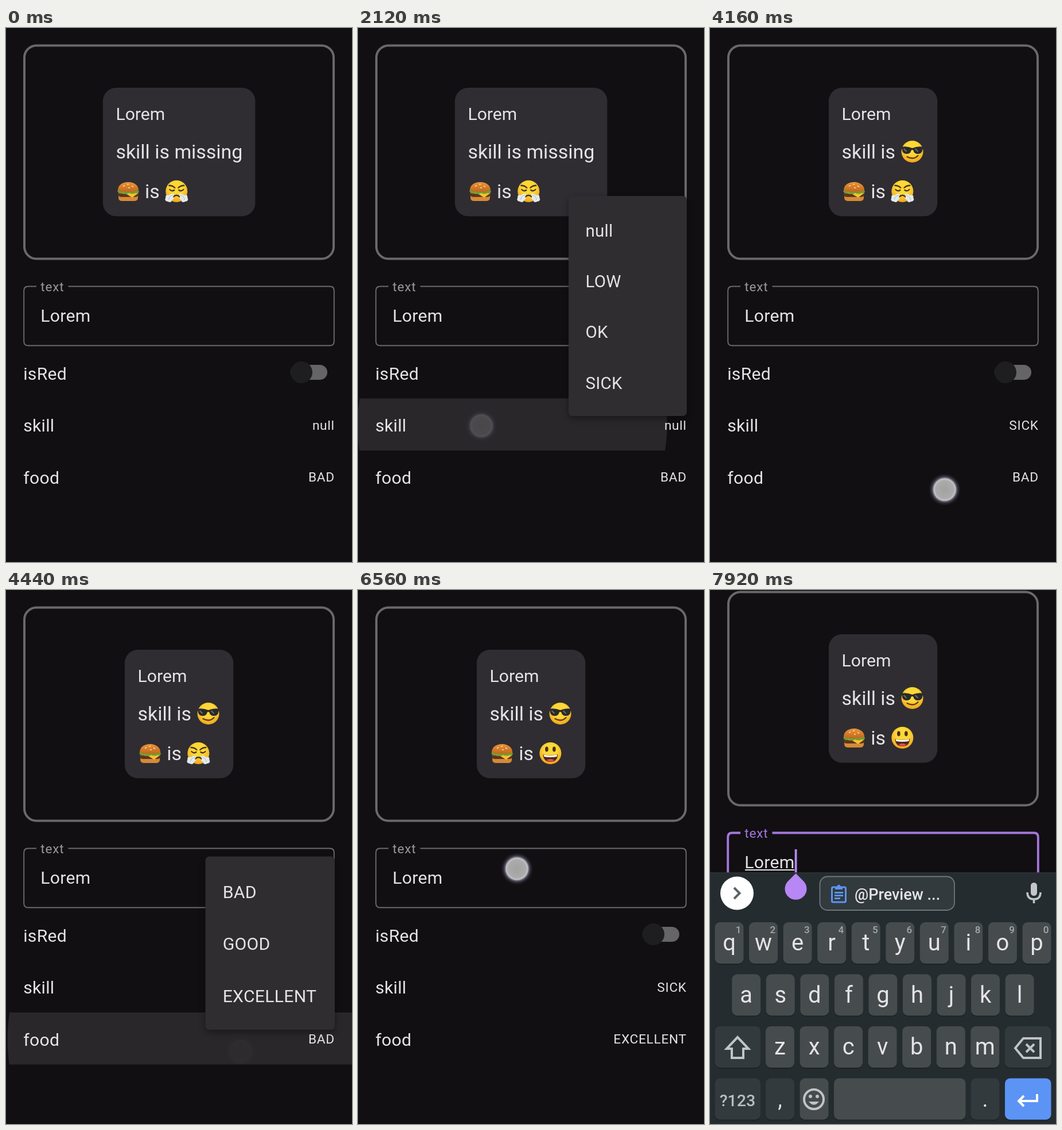
An HTML page for the animation above (8000 ms loop, 603 by 929 pixels).

```html
<!DOCTYPE html>
<html lang="en">
<head>
<meta charset="utf-8">
<title>Component preview</title>
<style>
  html, body { margin: 0; width: 100%; height: 100%; overflow: hidden; background: #110f12; }
  svg { display: block; font-family: Roboto, sans-serif; fill: #e4e3e6; }
  #stage { width: 100%; height: 100%; }
  .body { font-size: 30.15px; letter-spacing: .28px; }
  .small { font-size: 22.6px; letter-spacing: .75px; }
  .card { font-size: 33.9px; }
  .end { text-anchor: end; }
  .mid { text-anchor: middle; }
  .line { fill: none; stroke-width: 4; stroke: #c0c4c6; }
  .menu > rect { fill: #2f2d30; filter: drop-shadow(0 4px 6px rgba(0, 0, 0, .4)); }
</style>
</head>
<body>
<svg id="stage" viewBox="0 0 603 929">
  <defs>
    <radialGradient id="skin" cy=".35" r=".65">
      <stop offset=".45" stop-color="#fdd835"/><stop offset="1" stop-color="#f2a51f"/>
    </radialGradient>
    <linearGradient id="bun" x2="0" y2="1">
      <stop offset="0" stop-color="#e8953a"/><stop offset="1" stop-color="#c5661c"/>
    </linearGradient>
    <radialGradient id="dotFill">
      <stop offset="0" stop-color="#a3a2a3"/><stop offset=".55" stop-color="#acabac"/>
      <stop offset=".68" stop-color="#c3c2c8"/><stop offset=".72" stop-color="#a8a5b8" stop-opacity=".7"/>
      <stop offset=".84" stop-color="#77758c" stop-opacity=".28"/>
      <stop offset="1" stop-color="#66647a" stop-opacity="0"/>
    </radialGradient>
    <g id="burger">
      <path d="M-17 7H17V11Q17 17 10 17H-10Q-17 17-17 11Z" fill="#d58a38"/>
      <path d="M-18 3Q-19 10-12 10H12Q19 10 18 3Z" fill="#62331d"/>
      <path d="M-17 3H18L7 11L-3 5Z" fill="#fbc02d"/>
      <path d="M-17-1H17V3H-17Z" fill="#d8432b"/>
      <path d="M-19 0Q-16-4-12-1Q-6-5 0-1Q6-5 12-1Q16-4 19 0Q18 5 13 3Q8 6 2 3Q-4 7-9 3Q-15 6-19 0Z" fill="#689f38"/>
      <path d="M-18-1C-19-21 19-21 18-1Q0 3-18-1Z" fill="url(#bun)"/>
      <path d="M-9-9l3-1M-2-12h3M6-9l3 1M0-6h3" stroke="#ffe0a0" stroke-width="1.5"/>
    </g>
    <g id="huff">
      <circle r="19" fill="url(#skin)"/>
      <path d="M-13-10Q-7-10-3-6M13-10Q7-10 3-6M-12-3Q-8 1-4-2M12-3Q8 1 4-2M-6 10Q0 4 6 10"
        fill="none" stroke="#4a3420" stroke-width="2.3" stroke-linecap="round"/>
      <g id="puff" fill="#e4eaee">
        <path d="M-4 5Q-9 3-13 7Q-20 5-19 11Q-22 17-15 18Q-9 21-8 15Q-3 14-6 10Z"/>
        <path d="M-6 7Q-13 8-14 15" fill="none" stroke="#b5c5cf" stroke-width="1.2"/>
      </g>
      <use href="#puff" transform="scale(-1 1)"/>
    </g>
    <g id="cool">
      <circle r="19" fill="url(#skin)"/>
      <path d="M-19-8Q-10-10 0-6Q10-10 19-8L18-4Q17 4 10 4Q3 4 2-2Q0-4-2-2Q-3 4-10 4Q-17 4-18-4Z" fill="#29292c"/>
      <path d="M-15-5l5 5M5-5l5 5" stroke="#6b6c70" stroke-width="2"/>
      <path d="M-9 9Q2 15 10 7" fill="none" stroke="#5d3b16" stroke-width="2.4" stroke-linecap="round"/>
    </g>
    <g id="grin">
      <circle r="19" fill="url(#skin)"/>
      <ellipse cx="-6.5" cy="-7" rx="2.8" ry="4.4" fill="#453018"/>
      <ellipse cx="6.5" cy="-7" rx="2.8" ry="4.4" fill="#453018"/>
      <path d="M-13 2Q0 5 13 2Q12 15 0 15Q-12 15-13 2Z" fill="#50291b"/>
      <path d="M-12 2.5Q0 5 12 2.5L11 6Q0 8-11 6Z" fill="#fff"/>
      <path d="M-7 12Q0 8 7 12Q0 17-7 12Z" fill="#ec4a4a"/>
    </g>
  </defs>

  <g id="screen">
    <rect x="32" y="30.5" width="539" height="371" rx="21" fill="none" stroke="#69686b" stroke-width="4"/>
    <rect id="cardBox" y="104" height="223.5" rx="23" fill="#2f2d31"/>
    <g id="cardText">
      <text id="title" y="159.5" font-size="30.15">Lorem</text>
      <text id="skillText" class="card" y="227"></text>
      <use id="skillFace" href="#cool" x="123" y="215"/>
      <use href="#burger" x="21.5" y="284"/>
      <text class="card" x="50.6" y="295.5">is</text>
      <use id="foodFace" x="105.8" y="284"/>
    </g>

    <path id="outline" fill="none"
      d="M108.5 449.5H564.5Q571.8 449.5 571.8 457V545Q571.8 552.5 564.5 552.5H38.5Q31.2 552.5 31.2 545V457Q31.2 449.5 38.5 449.5H53"/>
    <text id="label" class="small" x="60.3" y="457.5">text</text>
    <text class="body" x="60.3" y="511">Lorem</text>
    <rect id="underline" x="61" y="513" width="86" height="2"/>
    <rect id="caret" x="147.7" y="478" width="3.8" height="42" fill="#b687f5"/>

    <text class="body" x="30.2" y="611.5">isRed</text>
    <rect id="track" x="496" y="586" width="64" height="26" rx="13"/>
    <circle id="thumb" cy="599" r="19"/>
    <text class="body" x="30.2" y="702">skill</text>
    <text id="skillValue" class="small end" x="572.8" y="699"></text>
    <text class="body" x="30.2" y="792.5">food</text>
    <text id="foodValue" class="small end" x="572.8" y="789"></text>
  </g>
  <g id="skillMenu" class="menu"></g>
  <g id="foodMenu" class="menu"></g>

  <g id="keyboard">
    <rect y="491.5" width="603" height="440" fill="#252c2f"/>
    <path d="M0 492H603" stroke="#343b3e"/>
    <g id="keys"></g>
    <path class="line" d="M48 778L67 798H58V814H38V798H29Z"/>
    <path class="line" d="M546 780H576V814H546L532 797ZM551 790l14 14m0-14l-14 14"/>
    <circle class="line" cx="181" cy="886" r="17"/>
    <path d="M172 890Q181 901 190 890Z" fill="#c0c4c6"/>
    <circle cx="175" cy="881" r="3" fill="#c0c4c6"/><circle cx="187" cy="881" r="3" fill="#c0c4c6"/>
    <path class="line" d="M570 877V889H539M547 880L538 889L547 898" style="stroke:#fff"/>
    <rect x="559" y="509" width="11" height="23" rx="5.5" fill="#c3c6c8"/>
    <path class="line" d="M553 526Q553 538 564.5 538T576 526M564.5 538V545" style="stroke-width:3.5"/>
    <g id="suggest">
      <circle cx="47" cy="527.5" r="29" fill="#fff"/>
      <path class="line" d="M42 518L51.5 527.5L42 537" style="stroke:#5d6265"/>
      <rect x="191.5" y="498.5" width="234.5" height="58.5" rx="13" fill="#333a3e" stroke="#70767a" stroke-width="1.8"/>
      <rect x="212.5" y="517" width="24" height="26" rx="2" fill="none" stroke="#5b94f5" stroke-width="3"/>
      <path d="M218 516H221Q224.500 509 228 516H231V521H218ZM217 525H232V528H217ZM217 530H232V533H217ZM217 535H227V538H217Z" fill="#5b94f5"/>
      <text x="252" y="539" font-size="27" font-weight="500">@Preview ...</text>
    </g>
  </g>
  <path id="handle" d="M149.500 493L163 506.500A19 19 0 1 1 136 506.500Z" fill="#b687f5"/>
  <circle id="dot" r="28" fill="url(#dotFill)"/>
</svg>

<script>
const LOOP = 8000, ROW = 90.5, RIGHT = 573;
const $ = id => document.getElementById(id);
const set = (el, attrs) => { for (const k in attrs) el.setAttribute(k, attrs[k]); };
const add = (parent, tag, attrs, text = '') => {
  const el = document.createElementNS('http://www.w3.org/2000/svg', tag);
  set(el, attrs);
  el.textContent = text;
  return parent.appendChild(el);
};
const ramp = (t, a, b) => Math.min(1, Math.max(0, (t - a) / (b - a)));
const smooth = p => p * p * (3 - 2 * p);
const decel = p => 1 - (1 - p) ** 2.5;
const mix = (a, b, p) => a + (b - a) * p;

// State changes
const RED_ON = 320, RED_OFF = 1200, SKILL_SET = 3335, FOOD_SET = 5265, FOCUS = 6700;

// Drop-down menus, growing from their bottom right corner
const menus = [
  { el: $('skillMenu'), items: ['null', 'LOW', 'OK', 'SICK'], w: 211, bottom: 675, open: 2052, close: 3345 },
  { el: $('foodMenu'), items: ['BAD', 'GOOD', 'EXCELLENT'], w: 225.5, bottom: 765, open: 4285, close: 5280 }
];
for (const m of menus) {
  const x = RIGHT - m.w, h = m.items.length * ROW + 30, y = m.bottom - h;
  add(m.el, 'rect', { x, y, width: m.w, height: h, rx: 7 });
  m.items.forEach((s, i) => add(m.el, 'text', { class: 'body', x: x + 30.2, y: y + 72 + i * ROW }, s));
}

// Touches; box is the area that ripples: layer, x, y, width
const taps = [
  { x: 230, y: 611, down: 160, up: 300, ripple: 260, box: ['screen', 0, 554, 603] },
  { x: 233, y: 611, down: 1040, up: 1180, ripple: 1140, box: ['screen', 0, 554, 603] },
  { x: 215, y: 692, down: 1900, up: 2032, ripple: 1990, box: ['screen', 0, 644.5, 603] },
  { x: 435, y: 602, down: 3220, up: 3375, ripple: 3350, box: ['skillMenu', 362, 569.5, 211] },
  { x: 409, y: 803, down: 4160, up: 4325, ripple: 4260, box: ['foodMenu'.replace('foodMenu', 'screen'), 0, 735, 603] },
  { x: 452, y: 703, down: 5120, up: 5275, ripple: 5220, box: ['foodMenu', 347.5, 659.5, 225.5] },
  { x: 277, y: 485, down: 6560, up: 6690 }
];
for (const tap of taps.filter(p => p.box)) {
  const [layer, x, y, width] = tap.box;
  const clip = add($(layer), 'svg', { x, y, width, height: ROW });
  tap.circle = add(clip, 'circle', { fill: '#fff' });
}

// Keyboard
const PITCH = 59.55, KEY = '#464b4e', SPECIAL = '#333a3d';
function key(x, row, w, fill, label = '', size = 40, hint = '') {
  const y = 578 + row * ROW, keys = $('keys');
  add(keys, 'rect', { x, y: y + 1.5, width: w, height: 72, rx: 9, fill: '#1b2022' });
  add(keys, 'rect', { x, y, width: w, height: 72, rx: 9, fill });
  add(keys, 'text', { class: 'mid', x: x + w / 2, y: y + 49, 'font-size': size }, label);
  add(keys, 'text', { class: 'end', x: x + 46, y: y + 18.5, 'font-size': 17, 'font-weight': 500, fill: '#a4a8aa' }, hint);
}
[['qwertyuiop', 8.5], ['asdfghjkl', 38.2], ['zxcvbnm', 97]].forEach(([letters, x], row) =>
  [...letters].forEach((c, i) => key(x + i * PITCH, row, 50, KEY, c, 40, row ? '' : (i + 1) % 10)));
key(8.5, 2, 79.5, SPECIAL);
key(514, 2, 80.5, SPECIAL);
key(8.5, 3, 79.5, SPECIAL);
add($('keys'), 'text', { class: 'mid', x: 48, y: 897.5, 'font-size': 28.5, 'font-weight': 500, fill: '#b9bdbf' }, '?123');
key(97, 3, 50, SPECIAL, ',', 38);
key(156.5, 3, 50, KEY);
key(216, 3, 229.5, KEY);
key(454.5, 3, 50, SPECIAL, '.', 38);
key(514, 3, 80.5, '#5b94f5');

function drawCard(t) {
  const s = 20 * Math.max(0, t - SKILL_SET) / 1000;
  const w = mix(265.5, 189.3, 1 - (1 + s) * Math.exp(-s)), x = 301.6 - w / 2;
  const skilled = t >= SKILL_SET, fed = t >= FOOD_SET;
  set($('cardBox'), { x, width: w });
  set($('cardText'), { transform: `translate(${x + 22.6})` });
  $('skillText').textContent = skilled ? 'skill is' : 'skill is missing';
  set($('skillFace'), { opacity: +skilled });
  set($('foodFace'), { href: fed ? '#grin' : '#huff' });
  $('skillValue').textContent = skilled ? 'SICK' : 'null';
  $('foodValue').textContent = fed ? 'EXCELLENT' : 'BAD';
}

function drawSwitch(t) {
  const on = t >= RED_ON && t < RED_OFF;
  const p = smooth(ramp(t, RED_ON, RED_ON + 100)) - smooth(ramp(t, RED_OFF, RED_OFF + 100));
  set($('title'), { fill: on ? '#e60b0b' : '#e4e3e6' });
  set($('track'), { fill: on ? '#117a6f' : '#656466' });
  set($('thumb'), { cx: mix(515, 541, p), fill: on ? '#09d9c3' : '#1e1d20' });
}

function drawMenu(m, t) {
  const k = mix(.8, 1, decel(ramp(t, m.open, m.open + 120)));
  set(m.el, {
    opacity: ramp(t, m.open, m.open + 30) - ramp(t, m.close, m.close + 75),
    transform: `translate(${RIGHT} ${m.bottom}) scale(${k}) translate(${-RIGHT} ${-m.bottom})`
  });
}

function drawRipple({ circle, box, x, y, ripple, up }, t) {
  const w = box[3], p = smooth(ramp(t, ripple, ripple + 225));
  const out = Math.max(up, ripple + 225);
  set(circle, {
    cx: mix(x - box[1], w / 2, p), cy: mix(y - box[2], ROW / 2, p),
    r: mix(w * .3, Math.hypot(w, ROW) / 2 + 19, p),
    opacity: .1 * (ramp(t, ripple, ripple + 75) - ramp(t, out, out + 150))
  });
}

function drawTouch(t) {
  const tap = taps.findLast(p => t >= p.down);
  set($('dot'), tap
    ? { cx: tap.x, cy: tap.y, opacity: 1 - ramp(t, tap.up, tap.up + 120) }
    : { opacity: 0 });
}

function drawField(t) {
  const p = ramp(t, FOCUS, FOCUS + 150), focused = t >= FOCUS;
  const rise = decel(ramp(t, 6860, 7160)), shift = -27 * rise;
  const tint = (from, to) => `rgb(${from.map((c, i) => Math.round(mix(c, to[i], p)))})`;
  set($('outline'), { stroke: tint([107, 106, 108], [165, 119, 223]), 'stroke-width': mix(1.9, 3.8, p) });
  set($('label'), { fill: tint([154, 152, 155], [165, 119, 223]) });
  set($('caret'), { opacity: +(focused && (t - FOCUS) % 1000 < 500) });
  set($('underline'), { opacity: +(t >= 6900) });
  set($('handle'), { opacity: +focused, transform: `translate(0 ${27 + shift})` });
  set($('screen'), { transform: `translate(0 ${shift})` });
  set($('keyboard'), { transform: `translate(0 ${438 * (1 - rise)})` });
  set($('suggest'), { opacity: smooth(ramp(t, 7400, 7620)) });
}

const start = performance.now();
function frame(now) {
  const t = Math.max(0, now - start) % LOOP;
  drawCard(t);
  drawSwitch(t);
  menus.forEach(m => drawMenu(m, t));
  taps.forEach(p => p.box && drawRipple(p, t));
  drawTouch(t);
  drawField(t);
  requestAnimationFrame(frame);
}
frame(start);
</script>
</body>
</html>
```
